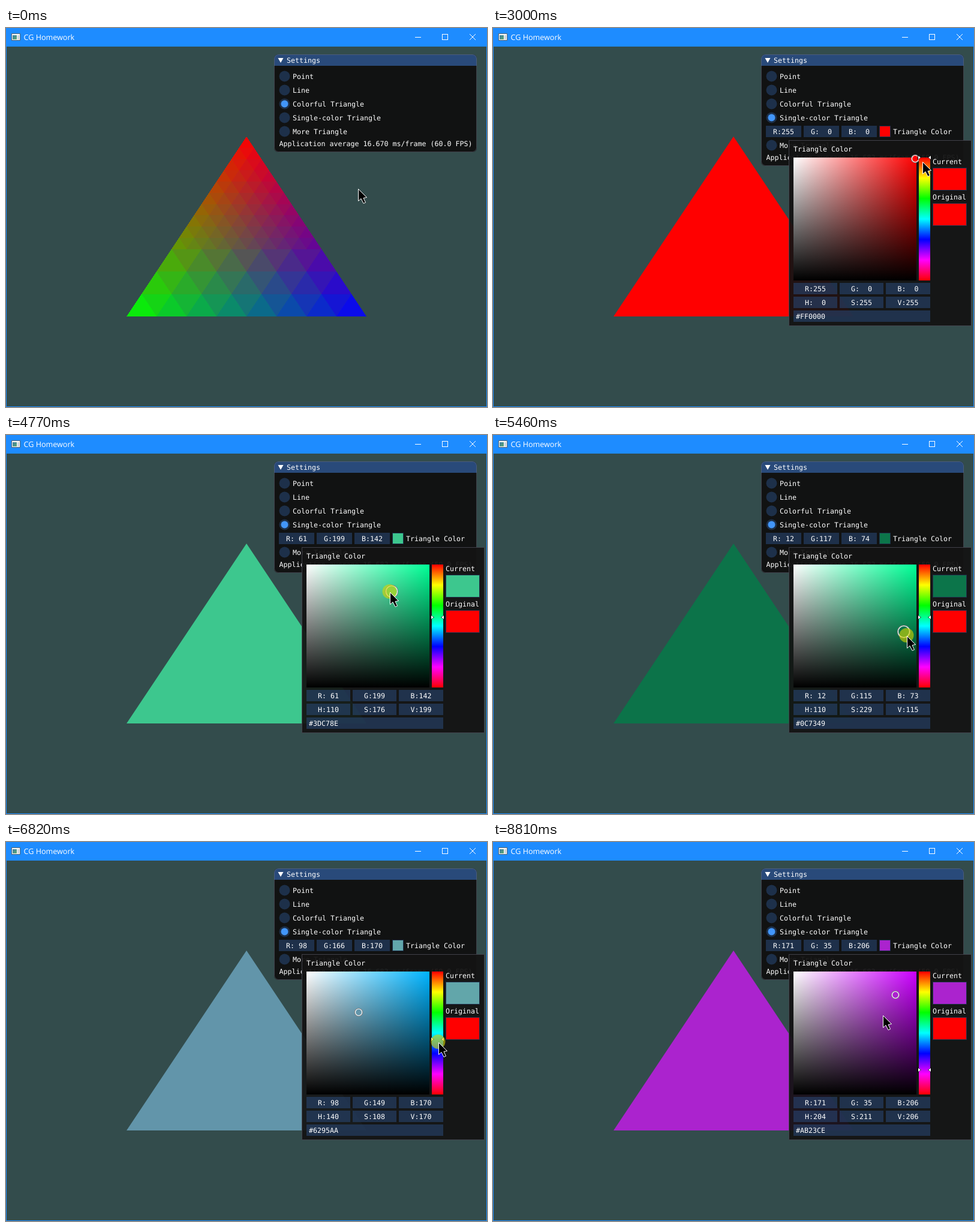
An HTML page with a canvas for the animation above (8890 ms loop, 802 by 632 pixels).

```html
<!DOCTYPE html>
<html lang="en">
<head>
<meta charset="utf-8">
<title>CG Homework</title>
<style>
  html, body { margin: 0; width: 100%; height: 100%; overflow: hidden; background: #334c4c; }
  canvas { display: block; }
</style>
</head>
<body>
<canvas id="stage" width="802" height="632"></canvas>
<script>
const ctx = document.getElementById('stage').getContext('2d');
const LOOP = 8890, STEPS = 115;
const SELECT = 15, HOVERED = 25, OPEN = 29; // steps at which the interface changes
const LAG = .75, PANEL_LAG = .9;            // steps by which colours trail the pointer
const MONO = '11.63px "DejaVu Sans Mono", monospace';
const FRAME = 'rgba(41,74,122,.54)', HOVER = 'rgba(66,150,250,.4)';
const EDGE = 'rgba(110,110,128,.5)';

// Colour square and hue bar
const SV = { x: 501, y: 216, size: 205 }, BAR = 710;
const UNIT = 255 / SV.size;

// Turning points of the pointer: step, x, y
const PATH = [
  [0, 587, 268], [12, 500, 151], [SELECT, 500, 151], [HOVERED, 653, 172], [30, 653, 172],
  [39, 716, 223], [41, 716, 223], [49, 725, 274], [53, 722, 304.4],
  [56, 688, 318], [60, 643.1, 261], [61.25, 643.1, 261], [62, 640, 262], [70, 690, 335],
  [75.5, 557.3, 353.6], [76.25, 557.3, 321.3], [77, 557, 307], [82, 587.8, 284.3],
  [86.9, 720, 310], [87.25, 720, 328.6], [88, 721, 334], [97, 722, 379.9],
  [101, 612, 305], [109, 671.1, 255.4], [111, 671, 255], [114, 650, 289]];

// Button-down spans, in steps
const CLICKS = [[14, 14], [28, 28]];
const HUE_DRAGS = [[41, 53], [87, 97]];
const SV_DRAGS = [[56, 82], [101, 109]];

const during = (spans, k) => spans.some(([a, b]) => k >= a && k <= b);

function pointer(at) {
  const i = PATH.findIndex(p => p[0] > at);
  if (i < 0) return PATH[PATH.length - 1].slice(1);
  const [k0, x0, y0] = PATH[i - 1], [k1, x1, y1] = PATH[i];
  const u = (at - k0) / (k1 - k0);
  return [x0 + (x1 - x0) * u, y0 + (y1 - y0) * u];
}

// Where the latest drag has led to, if there was one
function dragged(spans, at) {
  const span = spans.filter(([a]) => a <= at).pop();
  return span && pointer(Math.min(at, span[1]));
}

// Hue, saturation and value (0..255)
function colorAt(at) {
  const hue = dragged(HUE_DRAGS, at), sv = dragged(SV_DRAGS, at);
  return [
    hue ? (hue[1] - SV.y) * UNIT : 0,
    sv ? (sv[0] - SV.x) * UNIT : 255,
    sv ? 255 - (sv[1] - SV.y) * UNIT : 255
  ];
}

function toRgb([h, s, v]) {
  const part = n => {
    const m = (n + h / 255 * 6) % 6;
    return Math.round(v * (1 - s / 255 * Math.max(0, Math.min(m, 4 - m, 1))));
  };
  return [part(5), part(3), part(1)];
}

const css = rgb => `rgb(${rgb})`;
const pad = n => String(n).padStart(3);
const hex = rgb => '#' + rgb.map(n => n.toString(16).padStart(2, '0')).join('').toUpperCase();

function box(x, y, w, h, fill) {
  ctx.fillStyle = fill;
  ctx.fillRect(x, y, w, h);
}

function round(x, y, w, h, r, fill) {
  ctx.beginPath();
  ctx.roundRect(x, y, w, h, r);
  ctx.fillStyle = fill;
  ctx.fill();
}

function text(str, x, y, align = 'left') {
  ctx.font = MONO;
  ctx.textAlign = align;
  ctx.fillStyle = '#fff';
  ctx.fillText(str, x, y);
}

function poly(fill, ...pts) {
  ctx.beginPath();
  for (let i = 0; i < pts.length; i += 2) ctx.lineTo(pts[i], pts[i + 1]);
  ctx.closePath();
  ctx.fillStyle = fill;
  ctx.fill();
}

function disc(x, y, r, fill) {
  ctx.beginPath();
  ctx.arc(x, y, r, 0, 7);
  ctx.fillStyle = fill;
  ctx.fill();
}

function ring(x, y, r, color) {
  ctx.beginPath();
  ctx.arc(x, y, r, 0, 7);
  ctx.strokeStyle = color;
  ctx.lineWidth = 1.2;
  ctx.stroke();
}

function field(str, x, y, w, hot) {
  box(x, y, w, 19, hot ? HOVER : FRAME);
  text(str, x + w / 2, y + 14, 'center');
}

function swatch(x, y, w, h, rgb) {
  box(x, y, w, h, FRAME);
  box(x + 1, y + 1, w - 2, h - 2, css(rgb));
}

function popup(x, y, w, h) {
  box(x, y, w, h, 'rgba(20,20,20,.94)');
  ctx.strokeStyle = EDGE;
  ctx.lineWidth = 1;
  ctx.strokeRect(x + .5, y + .5, w - 1, h - 1);
}

// Three-colour triangle built from flat facets, finer towards the top
const facets = (() => {
  const c = document.createElement('canvas');
  c.width = 400;
  c.height = 300;
  const g = c.getContext('2d'), img = g.createImageData(400, 300);
  for (let y = 0; y < 300; y++) for (let x = 0; x < 400; x++) {
    const r = 1 - (y + .5) / 300, b = (x + .5) / 400 - r / 2, gr = 1 - r - b;
    if (b < 0 || gr < 0) continue;
    const n = r < 3 / 8 ? 8 : 16;
    const cell = [r, gr, b].map(v => Math.floor(v * n));
    const rest = (n - cell[0] - cell[1] - cell[2]) / 3;
    const o = (y * 400 + x) * 4;
    cell.forEach((v, i) => img.data[o + i] = (v + rest) / n * 255);
    img.data[o + 3] = 255;
  }
  g.putImageData(img, 0, 0);
  return c;
})();

function drawWindow() {
  box(0, 0, 802, 632, '#1e8cff');
  box(1, 31, 800, 600, '#334c4c');
  box(9, 9, 15, 12, '#5c6670');
  box(10, 10, 13, 10, '#fff');
  const g = ctx.createLinearGradient(11, 11, 18, 19);
  g.addColorStop(0, '#3d78a8');
  g.addColorStop(1, '#5aa86e');
  box(11, 12, 7, 7, g);
  box(19, 12, 3, 7, '#c9d2da');
  ctx.font = '12.6px "Open Sans", "Noto Sans", sans-serif';
  ctx.textAlign = 'left';
  ctx.fillStyle = '#fff';
  ctx.fillText('CG Homework', 29.5, 20);
  box(682, 15, 10, 1, '#fff');
  ctx.strokeStyle = '#fff';
  ctx.lineWidth = 1;
  ctx.strokeRect(727.5, 10.5, 9, 9);
  ctx.beginPath();
  ctx.moveTo(773, 10); ctx.lineTo(783, 20);
  ctx.moveTo(783, 10); ctx.lineTo(773, 20);
  ctx.stroke();
}

function drawSettings(k, rgb, hot) {
  const single = k >= SELECT, h = single ? 186 : 163;
  round(447, 44, 338, h, 7, 'rgba(15,15,15,.94)');
  round(447, 44, 338, 19, [7, 7, 0, 0], '#294a7a');
  ctx.beginPath();
  ctx.roundRect(447.5, 44.5, 337, h - 1, 7);
  ctx.strokeStyle = EDGE;
  ctx.lineWidth = 1;
  ctx.stroke();
  poly('#fff', 453.5, 50, 462.5, 50, 458, 58);
  text('Settings', 468, 58);

  ['Point', 'Line', 'Colorful Triangle', 'Single-color Triangle', 'More Triangle'].forEach((name, i) => {
    const y = 80.5 + 23 * (i === 4 && single ? 5 : i);
    disc(464.5, y, 9, hot(455, y - 9.5, 23 + name.length * 7, 19) ? HOVER : FRAME);
    if (i === (single ? 3 : 2)) disc(464.5, y, 6, '#4296fa');
    text(name, 478, y + 4.5);
  });
  if (single) {
    rgb.forEach((v, i) => {
      const x = 455 + 63 * i;
      field('RGB'[i] + ':' + pad(v), x, 163, 59, hot(x, 163, 59, 19));
    });
    swatch(644, 163, 19, 19, rgb);
    text('Triangle Color', 667, 177);
  }
  const rate = k < 7 ? '16.670 ms/frame (60.0' : '16.682 ms/frame (59.9';
  text(`Application average ${rate} FPS)`, 455.5, single ? 220 : 197);
}

function drawTooltip(rgb) {
  popup(581, 195, 216, 61);
  swatch(589, 203, 45, 45, rgb);
  [hex(rgb), 'R:255, G:0, B:0', '(1.000, 0.000, 0.000)'].forEach((line, i) => text(line, 642, 213 + 13 * i));
}

function drawSquare(k, hsv, rgb) {
  const { x, y, size } = SV;
  let g = ctx.createLinearGradient(x, 0, x + size, 0);
  g.addColorStop(0, '#fff');
  g.addColorStop(1, css(toRgb([hsv[0], 255, 255])));
  box(x, y, size, size, g);
  g = ctx.createLinearGradient(0, y, 0, y + size);
  g.addColorStop(0, 'rgba(0,0,0,0)');
  g.addColorStop(1, '#000');
  box(x, y, size, size, g);

  const cx = Math.min(x + size - 2, Math.round(x + hsv[1] / UNIT));
  const cy = Math.max(y + 2, Math.round(y + size - hsv[2] / UNIT));
  const r = during(SV_DRAGS, k) ? 10 : 6;
  disc(cx, cy, r, css(rgb));
  ring(cx, cy, r + .5, '#808080');
  ring(cx, cy, r - .5, '#fff');
}

function drawBar(hue) {
  const g = ctx.createLinearGradient(0, SV.y, 0, SV.y + SV.size);
  for (let i = 0; i < 7; i++) g.addColorStop(i / 6, css(toRgb([i * 42.5, 255, 255])));
  box(BAR, SV.y, 19, SV.size, g);
  const y = Math.round(SV.y + hue / UNIT);
  const arrow = (x, dir) => {
    poly('#000', x - dir, y - 4, x + 5 * dir, y, x - dir, y + 4);
    poly('#fff', x, y - 3, x + 4 * dir, y, x, y + 3);
  };
  arrow(BAR - 1, 1);
  arrow(BAR + 20, -1);
}

function drawPicker(k, hsv, rgb, shown) {
  popup(493, 187, 305, 310);
  text('Triangle Color', 501, 206);
  drawSquare(k, hsv, rgb);
  drawBar(hsv[0]);

  const levels = [Math.round(hsv[0]), Math.floor(hsv[1] + .05), Math.round(hsv[2])];
  rgb.forEach((v, i) => {
    const x = 501 + 77 * i, w = i < 2 ? 73 : 74;
    field('RGB'[i] + ':' + pad(v), x, 425, w);
    field('HSV'[i] + ':' + pad(levels[i]), x, 448, w);
  });
  box(501, 471, 228, 19, FRAME);
  text(hex(rgb), 505, 485);
  text('Current', 733, 227);
  swatch(733, 233, 57, 38, shown);
  text('Original', 733, 286);
  swatch(733, 292, 57, 38, [255, 0, 0]);
}

function drawPointer(x, y, down) {
  if (down) disc(x - .5, y - 1, 12, 'rgba(215,215,0,.6)');
  ctx.save();
  ctx.translate(x + .5, y + .5);
  poly('#000', 0, 0, 0, 20, 4.5, 16, 8.5, 24, 12, 22.5, 8.5, 15, 14, 14);
  ctx.strokeStyle = '#fff';
  ctx.lineWidth = 1;
  ctx.stroke();
  ctx.restore();
}

function draw() {
  const k = Math.floor(performance.now() % LOOP / LOOP * STEPS + .32);
  const [px, py] = pointer(k).map(Math.round);
  const hsv = colorAt(k - LAG), rgb = toRgb(hsv), shown = toRgb(colorAt(k - PANEL_LAG));
  const open = k >= OPEN;
  const hot = (x, y, w, h) => !open && px >= x && px < x + w && py >= y && py < y + h;

  ctx.textRendering = 'geometricPrecision';
  drawWindow();
  if (k < SELECT) ctx.drawImage(facets, 201, 181);
  else poly(css(rgb), 401, 181, 601, 481, 201, 481);
  drawSettings(k, shown, hot);
  if (open) drawPicker(k, hsv, rgb, shown);
  else if (k >= HOVERED) drawTooltip(rgb);
  drawPointer(px, py, during([...CLICKS, ...HUE_DRAGS, ...SV_DRAGS], k));
  requestAnimationFrame(draw);
}
draw();
</script>
</body>
</html>
```
